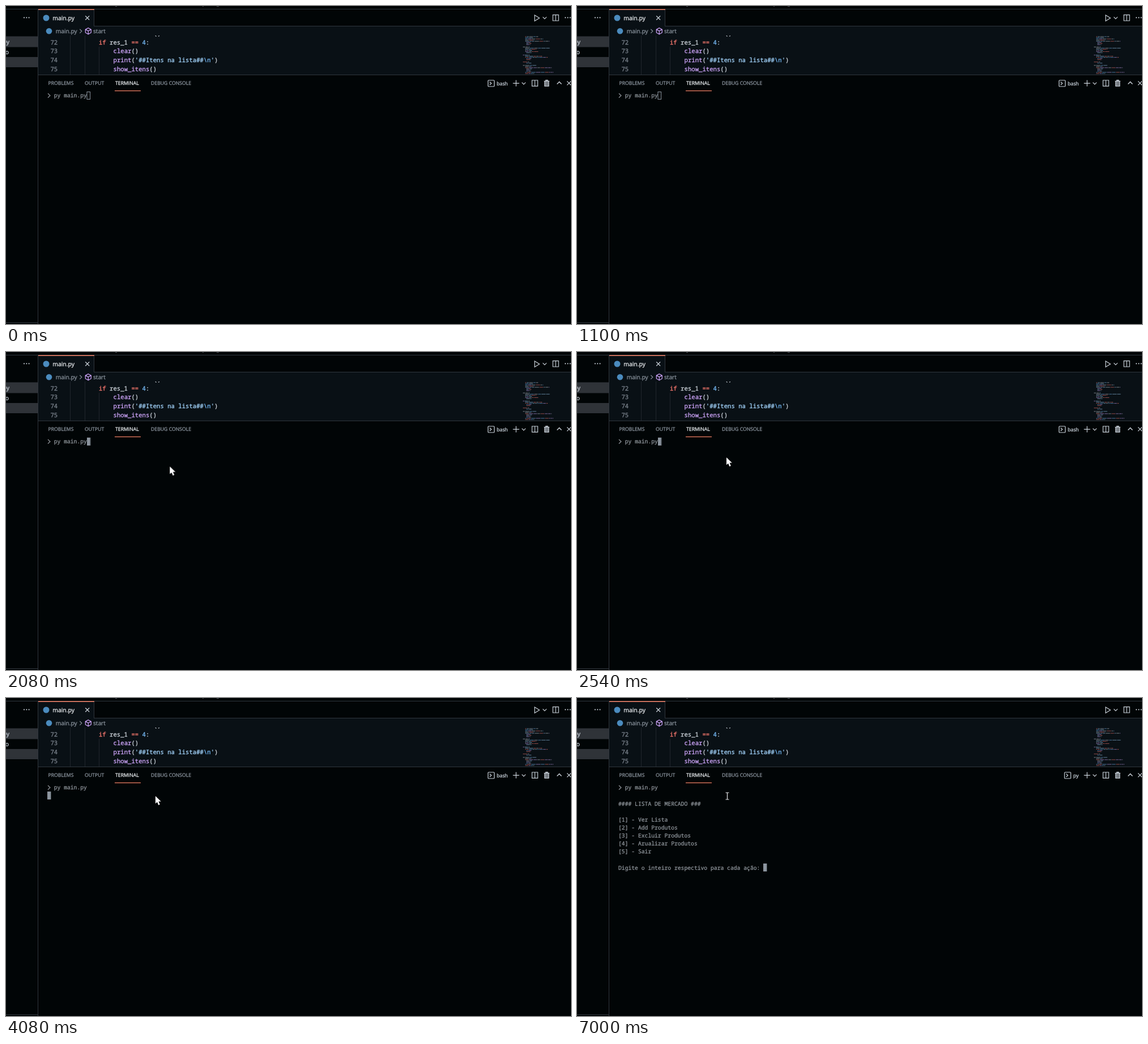
Animation, 998 px wide and 561 px high, one loop 8 s. Source, as an HTML page:

```html
<!DOCTYPE html>
<html lang="pt">
<head>
<meta charset="utf-8">
<title>Terminal</title>
<style>
  html, body { margin: 0; width: 100%; height: 100%; overflow: hidden; background: #010506; }
  svg { display: block; width: 998px; height: 561px; }
  text, tspan { white-space: pre; text-rendering: geometricPrecision; fill: currentColor; stroke: currentColor; stroke-width: .28; }
  .ui { font: 10.4px "Open Sans", "Noto Sans", sans-serif; color: #c9d1d9; }
  .small { font-size: 8.7px; }
  .bright { color: #f0f3f6; }
  .muted { color: #8b949e; }
  .code { font: 10.63px "Noto Sans Mono", "DejaVu Sans Mono", monospace; color: #d0d7de; }
  .term { font: 9.71px "Noto Sans Mono", "DejaVu Sans Mono", monospace; color: #8f959b; }
  .num { color: #7d858f; }
  .key { color: #ff7b72; }
  .fn { color: #d2a8ff; }
  .str { color: #a5d6ff; }
  .lit { color: #79c0ff; }
  .line { fill: none; stroke: #c9d1d9; stroke-width: 1.2; }
  .rule { fill: none; stroke: #30363d; }
  .accent { fill: #f78166; }

  .hollow, .caret, .menu, .arrow, .beam, .bash, .py { animation: 8s step-end infinite; }
  .hollow { animation-name: hollow; }
  .caret { animation-name: caret; }
  .menu { animation-name: menu; }
  .beam { animation-name: beam; }
  .arrow { animation-name: arrow; }
  .bash { animation-name: bash; }
  .py { animation-name: py; }
  .pointer { animation: move 8s ease-out infinite; }

  @keyframes hollow { 0% { opacity: 1 } 19.25%, 100% { opacity: 0 } }
  @keyframes caret {
    0% { opacity: 0; transform: translate(142.5px, 151px) }
    19.25% { opacity: 1; transform: translate(142.5px, 151px) }
    46.25% { opacity: 1; transform: translate(73px, 165px) }
    52.75%, 100% { opacity: 1; transform: translate(329px, 292px) }
  }
  @keyframes menu { 0% { opacity: 0 } 52.75%, 100% { opacity: 1 } }
  @keyframes beam { 0% { opacity: 0 } 53.75%, 100% { opacity: 1 } }
  @keyframes arrow { 0% { opacity: 1 } 53.75%, 100% { opacity: 0 } }
  @keyframes bash { 0% { opacity: 1 } 83.75%, 100% { opacity: 0 } }
  @keyframes py { 0% { opacity: 0 } 83.75%, 100% { opacity: 1 } }
  @keyframes move {
    0%, 14.75% { transform: translate(425px, 565px) }
    19.25%, 20.75% { transform: translate(367px, 239.5px); animation-timing-function: linear }
    25% { transform: translate(300px, 207px) }
    30% { transform: translate(266px, 191px); animation-timing-function: linear }
    31.75% { transform: translate(264px, 186px) }
    40%, 100% { transform: translate(264px, 173px) }
  }
</style>
</head>
<body>
<svg viewBox="0 0 998 561">
  <defs>
    <clipPath id="editor"><rect x="57" y="52" width="941" height="69"/></clipPath>
    <g id="dots" fill="#c9d1d9"><circle r="1.1"/><circle cx="4.3" r="1.1"/><circle cx="8.6" r="1.1"/></g>
    <path id="chevron" class="line" d="M-3.3-1.6 0 1.7 3.3-1.6"/>
    <path id="split" class="line" d="M-5-5.2H5V5.2H-5ZM0-5.2V5.2"/>
    <path id="cross" class="line" d="M-3.5-3.5 3.5 3.5M3.5-3.5-3.5 3.5"/>
    <g id="shell" class="line"><rect x=".5" y="-5.5" width="11" height="11" rx="1"/><path d="M3.4-2.8 6.4 0 3.4 2.8"/></g>
  </defs>

  <rect width="998" height="561" fill="#010506"/>
  <rect x="57" y="36" width="941" height="85" fill="#091015"/>
  <rect x="57" y="6" width="99" height="30" fill="#091015"/>
  <path d="M193 .5h3M347 .5h2M372 .5h4" stroke="#4a5058"/>

  <!-- side bar -->
  <path d="M0 53.5H56V72.5H0ZM0 90H56V108H0Z" fill="#2f3338"/>
  <use href="#dots" x="32" y="20.5"/>
  <text class="ui" x="6" y="67" text-anchor="end">py</text>
  <text class="ui" x="5" y="84.5" text-anchor="end" font-weight="600">o</text>
  <path class="rule" d="M0 5.5H998M56.5 6V561M155.5 7V36M156 35.5H998M57 121.5H998M0 558.5H56"/>
  <rect class="accent" x="57" y="5.5" width="99" height="1.5"/>

  <!-- tab and breadcrumb -->
  <circle cx="71" cy="21" r="5.5" fill="#4b8bbe"/>
  <text class="ui bright" x="82.3" y="24.8">main.py</text>
  <use href="#cross" x="143.7" y="21"/>
  <circle cx="76" cy="44.3" r="5.3" fill="#4b8bbe"/>
  <g class="ui" style="font-size:10.2px">
    <text class="muted" x="87.8" y="48">main.py</text>
    <text class="muted" x="154" y="48">start</text>
  </g>
  <path class="line" style="stroke:#8b949e" d="M130.3 40.8 133.8 44.3 130.3 47.8"/>
  <path class="line" style="stroke:#d2a8ff" d="M145.3 38.8 150.3 41.4V47L145.3 49.8 140.3 47V41.4ZM140.3 41.4 145.3 44 150.3 41.4M145.3 44V49.8"/>
  <path class="line" d="M933.8 16V26.4L942.2 21.2Z"/>
  <use href="#chevron" x="951.5" y="21"/>
  <use href="#split" x="971" y="20.8"/>
  <use href="#dots" x="988" y="20.5"/>

  <!-- code -->
  <g clip-path="url(#editor)">
    <path d="M113.5 52V121M139.5 52V121M164.5 72V121" stroke="#20252c"/>
    <g class="code">
      <text x="261" y="52.3">()</text>
      <text class="num" x="78.5" y="67.6">72</text>
      <text class="num" x="78.5" y="83.4">73</text>
      <text class="num" x="78.5" y="99.3">74</text>
      <text class="num" x="78.5" y="115.2">75</text>
      <text x="164" y="67.6"><tspan class="key">if</tspan> res_1 <tspan class="key">==</tspan> <tspan class="lit">4</tspan>:</text>
      <text x="189.6" y="83.4"><tspan class="fn">clear</tspan>()</text>
      <text x="189.6" y="99.3"><tspan class="fn">print</tspan>(<tspan class="str">'##Itens na lista##</tspan><tspan class="lit">\n</tspan><tspan class="str">'</tspan>)</text>
      <text x="189.6" y="115.2"><tspan class="fn">show_itens</tspan>()</text>
    </g>
    <g id="minimap" opacity=".5"></g>
  </g>

  <!-- panel header -->
  <g class="ui small">
    <text class="muted" x="74.5" y="139.3">PROBLEMS</text>
    <text class="muted" x="139" y="139.3">OUTPUT</text>
    <text class="bright" x="193" y="139.3">TERMINAL</text>
    <text class="muted" x="256" y="139.3">DEBUG CONSOLE</text>
    <g class="bash"><use href="#shell" x="851" y="136.5"/><text x="866.8" y="139.6">bash</text></g>
    <g class="py"><use href="#shell" x="860.7" y="136.5"/><text x="876.5" y="139.6">py</text></g>
  </g>
  <rect class="accent" x="192" y="149" width="46" height="1.2"/>
  <path class="line" d="M895.5 136.3H906.5M901 130.8V141.8"/>
  <use href="#chevron" x="914.5" y="136.5"/>
  <use href="#split" x="934.2" y="136.2"/>
  <path class="line" style="fill:#777d83" d="M950.3 132.5H959.9M953.3 132.3V130.8H956.9V132.3M951.5 132.5V141.5H958.7V132.5"/>
  <use href="#chevron" transform="translate(977.3 135.8) scale(1.2 -1.2)"/>
  <use href="#cross" x="994.5" y="136.2"/>

  <!-- terminal -->
  <g class="term">
    <path class="line" style="stroke:#8f959b" d="M74 154.3 78 158 74 161.7"/>
    <text x="84.7" y="161.4">py main.py</text>
    <g class="menu" id="menu"></g>
  </g>
  <rect class="hollow" x="143" y="151.5" width="5.6" height="13" fill="none" stroke="#8b949e"/>
  <rect class="caret" width="6.4" height="14" fill="#8b949e"/>

  <g class="pointer">
    <path class="arrow" fill="#fff" d="M0 0V13.2L3 10.4 5.4 15.9 7.8 14.8 5.5 9.6H9.8Z"/>
    <path class="line beam" style="stroke:#e6e8ea" d="M-1.5-6H4.5M1.5-6V6M-1.5 6H4.5"/>
  </g>
</svg>
<script>
  const SVG = 'http://www.w3.org/2000/svg';
  function add(parent, tag, attrs, text = '') {
    const node = document.createElementNS(SVG, tag);
    for (const name in attrs) node.setAttribute(name, attrs[name]);
    node.textContent = text;
    parent.append(node);
  }

  const lines = [
    '#### LISTA DE MERCADO ###', '',
    '[1] - Ver Lista', '[2] - Add Produtos', '[3] - Excluir Produtos',
    '[4] - Arualizar Produtos', '[5] - Sair', '',
    'Digite o inteiro respectivo para cada ação: '
  ];
  const menu = document.getElementById('menu');
  lines.forEach((line, i) => add(menu, 'text', { x: 73, y: 189.6 + i * 14.12 }, line));

  // Miniature code: one length per row; a row after a gap is a heading, short rows are nested
  const minimap = document.getElementById('minimap');
  const lengths = [23, 14, 32, 16, 43, 8, 9, 7, 0, 12, 44, 20, 12, 24, 9, 0, 12,
                   30, 40, 9, 8, 0, 11, 9, 0, 24, 12, 47, 10, 8, 9, 50, 16];
  const colors = ['#d2a8ff', '#a5d6ff', '#c9d1d9', '#79c0ff', '#ff7b72'];
  let seed = 7;
  const random = () => (seed = seed * 16807 % 2147483647) / 2147483647;
  lengths.forEach((length, row) => {
    let x = lengths[row - 1] === 0 ? 913 : length < 12 ? 919 : 917;
    const end = x + length;
    while (x < end) {
      const width = Math.min(2 + random() * 6, end - x);
      const fill = colors[Math.floor(random() * colors.length)];
      add(minimap, 'rect', { x, y: 53.5 + row * 2.03, width, height: 1.1, fill });
      x += width + 0.8;
    }
  });
</script>
</body>
</html>
```
